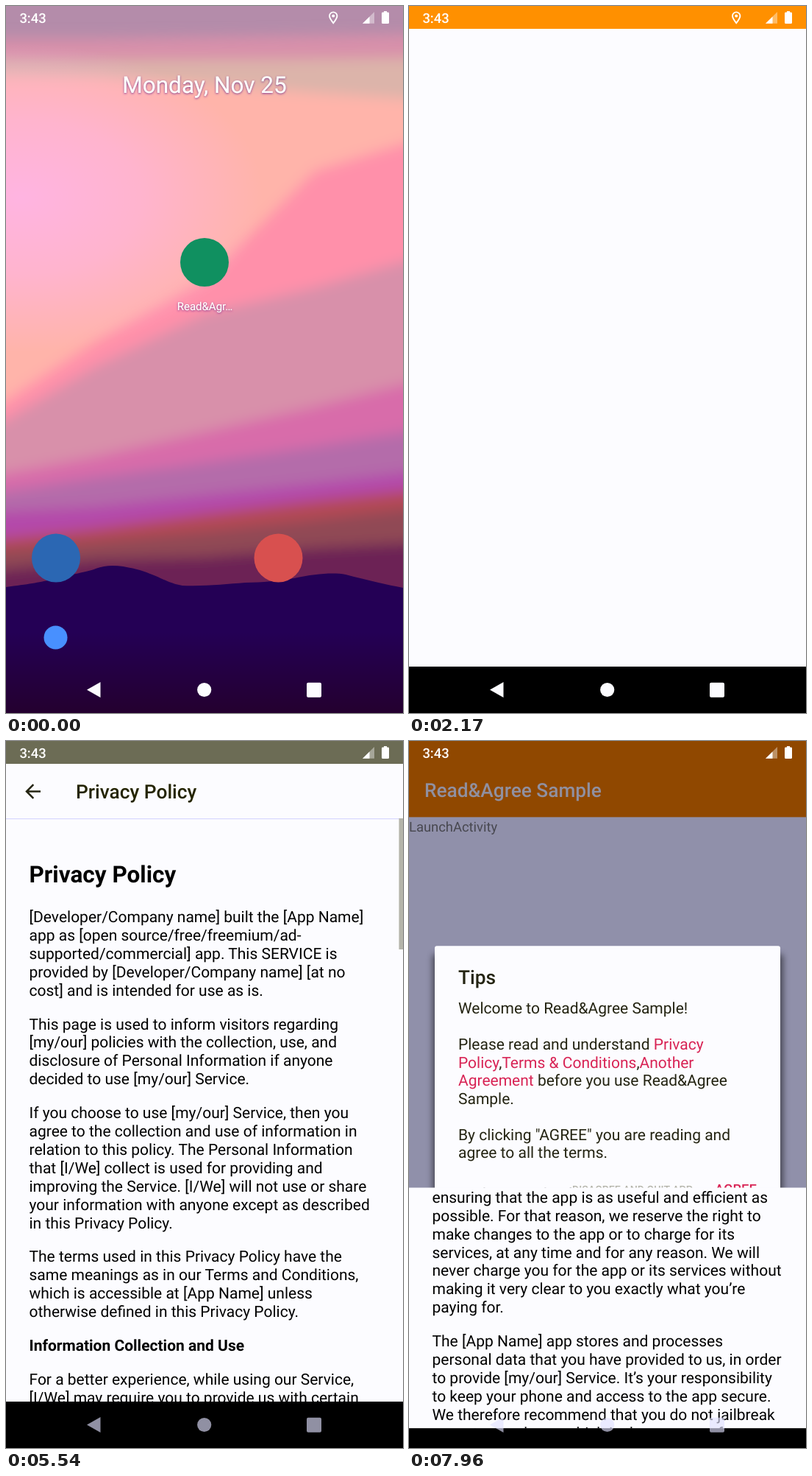
An HTML page that plays this animation: 540x960 px, repeating every 8 s.

```html
<!DOCTYPE html>
<html lang="en">
<head>
<meta charset="utf-8">
<title>Read and agree demo</title>
<style>
html, body { margin: 0; width: 100%; height: 100%; overflow: hidden; background: #000; }
svg { display: block; width: 100%; height: 100%; }
text { font-family: Roboto, "Noto Sans", sans-serif; white-space: pre; text-rendering: geometricPrecision; }
.medium { font-weight: 500; }
.bold { font-weight: 700; }
.title { font-size: 26.25px; font-weight: 500; }
.body { font-size: 21px; }
.link { fill: #d82455; }
</style>
</head>
<body>
<svg viewBox="0 0 540 960" xmlns="http://www.w3.org/2000/svg">
  <defs>
    <filter id="soft" x="-10%" y="-10%" width="120%" height="120%"><feGaussianBlur stdDeviation="9"/></filter>
    <filter id="haze" x="-10%" y="-10%" width="120%" height="120%"><feGaussianBlur stdDeviation="4"/></filter>
    <filter id="glow" x="-20%" y="-40%" width="140%" height="180%">
      <feDropShadow dx="0" dy="1" stdDeviation="1.8" flood-color="#7a2a90" flood-opacity=".95"/>
    </filter>
    <radialGradient id="blush">
      <stop offset="0" stop-color="#ffb4ff" stop-opacity=".65"/>
      <stop offset=".5" stop-color="#ffb4ff" stop-opacity=".42"/>
      <stop offset="1" stop-color="#ffb4ff" stop-opacity="0"/>
    </radialGradient>
    <linearGradient id="dusk" x1="0" y1="0" x2="0" y2="1">
      <stop offset="0" stop-color="#240000" stop-opacity="0"/>
      <stop offset="1" stop-color="#240000" stop-opacity=".45"/>
    </linearGradient>
    <clipPath id="launchClip"><rect id="launchRect"/></clipPath>
    <clipPath id="pageClip"><rect id="pageRect" width="540" height="960"/></clipPath>
    <clipPath id="viewClip"><rect y="105" width="540" height="792"/></clipPath>
  </defs>

  <g id="home">
    <rect width="540" height="960" fill="#b48caa"/>
    <g id="sky" filter="url(#soft)"></g>
    <ellipse cx="20" cy="260" rx="330" ry="210" fill="url(#blush)"/>
    <path d="M0 789 C30 785 45 783 60 779 C90 771 110 769 122 764 C140 757 160 760 182 766 C208 774 221 784 240 787 C270 788 300 785 325 783 C350 783 370 780 392 777 C420 771 445 769 462 772 C485 778 510 784 540 790 V960 H0Z" fill="#240055"/>
    <rect y="850" width="540" height="110" fill="url(#dusk)"/>
    <g fill="#fff" filter="url(#glow)">
      <text x="270" y="118" font-size="31.5" text-anchor="middle">Monday, Nov 25</text>
      <text x="270.5" y="413" font-size="15" text-anchor="middle">Read&amp;Agr…</text>
    </g>
    <circle cx="270" cy="348" r="33" fill="#109060"/>
    <circle cx="68" cy="749.5" r="33" fill="#2b67b3"/>
    <circle cx="370.5" cy="749.5" r="33" fill="#d8504f"/>
    <circle cx="67.5" cy="857.5" r="16" fill="#4890ff"/>
  </g>

  <g id="splash" clip-path="url(#launchClip)">
    <rect width="540" height="960" fill="#fcfcff"/>
    <rect width="540" height="31" fill="#ff9000"/>
    <rect y="897" width="540" height="63"/>
  </g>

  <g id="app">
    <rect id="appBg" width="540" height="980"/>
    <rect id="appBar" width="540" height="105"/>
    <rect y="897" width="540" height="100"/>
    <text id="appTitle" class="title" x="21" y="78">Read&amp;Agree Sample</text>
    <text id="appText" x="0" y="125" font-size="18.4">LaunchActivity</text>
    <g id="dialog">
      <rect x="32" y="291" width="477" height="369" rx="5" opacity=".5" filter="url(#haze)"/>
      <rect x="35" y="280" width="470" height="368" rx="3" fill="#fcfcff"/>
      <g fill="#242412">
        <text class="title" x="67" y="331.3">Tips</text>
        <g id="message" class="body"></g>
      </g>
      <text class="medium" x="222" y="616" font-size="14.2" fill="#b4b4aa">DISAGREE AND QUIT APP</text>
      <text class="medium link" x="416" y="616.3" font-size="18.4">AGREE</text>
    </g>
  </g>

  <g id="page" clip-path="url(#pageClip)"></g>

  <g id="navKeys">
    <path d="M110 928.5 L128.5 918 V939Z"/>
    <circle cx="269.7" cy="928.5" r="9.6"/>
    <rect x="409" y="918.7" width="20" height="20" rx="2"/>
  </g>
  <g fill="#fff">
    <text class="medium" x="18.4" y="23" font-size="18.4">3:43</text>
    <g id="pin">
      <path d="M445.2 23.2 C442 19.2 440 16.6 440 13.6 A5.2 5.2 0 0 1 450.4 13.6 C450.4 16.6 448.4 19.2 445.2 23.2Z" fill="none" stroke="#fff" stroke-width="1.9"/>
      <circle cx="445.2" cy="13.6" r="2"/>
    </g>
    <path d="M485 23.7 L501 8 V23.7Z" opacity=".4"/>
    <path d="M485 23.7 L494.5 14.4 V23.7Z"/>
    <path d="M512.5 8.6 H514 V7 H518 V8.6 H519.5 Q521 8.6 521 10 V22.5 Q521 24 519.5 24 H512.5 Q511 24 511 22.5 V10 Q511 8.6 512.5 8.6Z"/>
  </g>
  <circle id="touch" r="14.5" fill="#e4e4e4" fill-opacity=".45" stroke="#fff" stroke-opacity=".45" stroke-width="1.5"/>
</svg>

<script>
const LOOP = 8000;
const $ = id => document.getElementById(id);
const set = (el, attrs) => { for (const k in attrs) el.setAttribute(k, attrs[k]); };
const clamp = v => Math.min(1, Math.max(0, v));
const span = (t, start, length) => clamp((t - start) / length);
const mix = (a, b, k) => a + (b - a) * k;
const show = (el, on) => { el.style.display = on ? '' : 'none'; };

function add(parent, tag, attrs, text = '') {
  const el = document.createElementNS('http://www.w3.org/2000/svg', tag);
  set(el, attrs);
  el.textContent = text;
  parent.appendChild(el);
  return el;
}

// Sky layers, top to bottom: colour, then the upper edge from left to right.
const layers = [
  ['#d890aa', 44, 44, 42, 40, 38],
  ['#dcb4aa', 72, 74, 73, 72, 70],
  ['#ffb4aa', 94, 96, 106, 118, 128],
  ['#ff90aa', 556, 456, 372, 224, 178],
  ['#d890aa', 580, 490, 418, 382, 338],
  ['#d86caa', 640, 612, 578, 544, 506],
  ['#b46caa', 664, 640, 620, 598, 574],
  ['#b448aa', 688, 680, 664, 648, 630],
  ['#b44855', 726, 710, 690, 672, 656],
  ['#904855', 742, 728, 714, 698, 680],
  ['#6c2455', 768, 752, 748, 736, 728]
];
for (const [fill, ...ys] of layers) {
  const edge = ys.map((y, i) => `${-30 + i * 150} ${y}`).join(' L');
  add($('sky'), 'path', { fill, d: `M${edge} V860 H-30Z` });
}

// Links are wrapped in braces; empty strings leave a blank line.
const message = [
  'Welcome to Read&Agree Sample!', '',
  'Please read and understand {Privacy}',
  '{Policy},{Terms & Conditions},{Another}',
  '{Agreement} before you use Read&Agree',
  'Sample.', '',
  'By clicking "AGREE" you are reading and',
  'agree to all the terms.'
];
message.forEach((line, i) => {
  const row = add($('message'), 'text', { x: 67, y: 372 + i * 24.5 });
  line.split(/[{}]/).forEach((part, j) => add(row, 'tspan', j % 2 ? { class: 'link' } : {}, part));
});

const privacy = [
  '[Developer/Company name] built the [App Name]|app as [open source/free/freemium/ad-|supported/commercial] app. This SERVICE is|provided by [Developer/Company name] [at no|cost] and is intended for use as is.',
  'This page is used to inform visitors regarding|[my/our] policies with the collection, use, and|disclosure of Personal Information if anyone|decided to use [my/our] Service.',
  'If you choose to use [my/our] Service, then you|agree to the collection and use of information in|relation to this policy. The Personal Information|that [I/We] collect is used for providing and|improving the Service. [I/We] will not use or share|your information with anyone except as described|in this Privacy Policy.',
  'The terms used in this Privacy Policy have the|same meanings as in our Terms and Conditions,|which is accessible at [App Name] unless|otherwise defined in this Privacy Policy.',
  '*Information Collection and Use',
  'For a better experience, while using our Service,|[I/We] may require you to provide us with certain'
];
const terms = [
  'By downloading or using the app, these terms will|automatically apply to you – you should make sure|therefore that you read them carefully before using|the app. You’re not allowed to copy or modify the|app, any part of the app, or our trademarks in any|way. You’re not allowed to attempt to extract the|source code of the app, and you also shouldn’t try|to translate the app into other languages or make|derivative versions. The app itself, and all the|trademarks, copyright, database rights, and other|intellectual property rights related to it, still belong|to [Developer/Company name].',
  '[Developer/Company name] is committed to|ensuring that the app is as useful and efficient as|possible. For that reason, we reserve the right to|make changes to the app or to charge for its|services, at any time and for any reason. We will|never charge you for the app or its services without|making it very clear to you exactly what you’re|paying for.',
  'The [App Name] app stores and processes|personal data that you have provided to us, in order|to provide [my/our] Service. It’s your responsibility|to keep your phone and access to the app secure.|We therefore recommend that you do not jailbreak|or root your phone, which is the process of'
];

function buildPage(title, paragraphs) {
  const page = add($('page'), 'g', {});
  add(page, 'rect', { width: 540, height: 960, fill: '#fcfcff' });
  add(page, 'rect', { width: 540, height: 31, fill: '#6c6c55' });
  add(page, 'rect', { y: 105, width: 540, height: 1.2, fill: '#d8d8ff' });
  add(page, 'path', { d: 'M47 68.5 H28 M37.3 59.2 L28 68.5 L37.3 77.8', fill: 'none', stroke: '#242412', 'stroke-width': 2.5 });
  add(page, 'text', { class: 'title', x: 95, y: 78, fill: '#242400' }, title);
  const view = add(page, 'g', { 'clip-path': 'url(#viewClip)' });
  add(view, 'text', { class: 'bold', x: 31.5, y: 191.5, 'font-size': 31.5 }, title);
  let y = 246;
  for (const p of paragraphs) {
    const bold = p[0] === '*';
    for (const line of p.slice(bold ? 1 : 0).split('|')) {
      add(view, 'text', { class: bold ? 'body bold' : 'body', x: 31.5, y }, line);
      y += 24.9;
    }
    y += 21;
  }
  add(view, 'rect', { x: 534.5, y: 105, width: 5.5, height: 178, fill: '#b4b4aa' });
  add(page, 'rect', { y: 897, width: 540, height: 63 });
  return page;
}
const privacyPage = buildPage('Privacy Policy', privacy);
const termsPage = buildPage('Terms & Conditions', terms);

// y at x on a cubic given by four points, found by bisection.
function bezier(x, [x0, y0, x1, y1, x2, y2, x3, y3]) {
  const at = (a, b, c, d, s) => {
    const r = 1 - s;
    return r * r * r * a + 3 * r * r * s * b + 3 * r * s * s * c + s * s * s * d;
  };
  let lo = 0, hi = 1;
  for (let i = 0; i < 24; i++) {
    const mid = (lo + hi) / 2;
    if (at(x0, x1, x2, x3, mid) < x) lo = mid; else hi = mid;
  }
  return at(y0, y1, y2, y3, lo);
}
const standard = x => bezier(x, [0, 0, .4, 0, .2, 1, 1, 1]);
const emphasized = x => x < 1 / 6
  ? bezier(x, [0, 0, .05, 0, .1333, .06, .1667, .4])
  : bezier(x, [.1667, .4, .2083, .82, .25, 1, 1, 1]);

// Colours from undimmed through partly dimmed to fully dimmed.
const shades = {
  appBg: [[252, 252, 255], [144, 144, 170], [108, 108, 85]],
  appBar: [[255, 144, 0], [144, 72, 0], [108, 72, 0]],
  appTitle: [[252, 252, 255], [144, 144, 160], [108, 108, 90]],
  appText: [[112, 112, 112], [72, 72, 80], [40, 40, 92]]
};
function shade(stops, dim) {
  const low = dim < .75;
  const k = low ? dim / .75 : (dim - .75) / .25;
  const [a, b] = low ? stops : stops.slice(1);
  return `rgb(${a.map((v, i) => Math.round(mix(v, b[i], k)))})`;
}

const LAUNCH = 1690, APP = 3210, DIALOG = 3230;
const OPEN = 5090, CLOSE = 6370, REOPEN = 7891, SLIDE = 425;
const touches = [
  [1430, 1570, 283, 366],
  [4850, 4980, 362, 415],
  [5960, 6120, 38, 70],
  [7640, 7770, 226, 440]
];

function draw(t) {
  show($('home'), t < 2170);
  show($('splash'), t >= LAUNCH && t < APP);
  show($('app'), t >= APP);
  show($('pin'), t < 4400);

  const grow = emphasized(span(t, LAUNCH, 450));
  set($('launchRect'), {
    x: mix(237, 0, grow), y: mix(315, 0, grow),
    width: mix(66, 540, grow), height: mix(66, 960, grow), rx: mix(33, 0, grow)
  });
  $('splash').style.opacity = span(t, LAUNCH, 70);

  // The page rises while its visible part unrolls from the bottom edge.
  let slide, reveal, dim;
  if (t < CLOSE) {
    const k = span(t, OPEN, SLIDE);
    slide = standard(k);
    reveal = emphasized(k);
    dim = span(t, DIALOG, 170) * (1 - span(t, OPEN, 280));
  } else if (t < REOPEN) {
    const k = span(t, CLOSE, SLIDE);
    slide = 1 - standard(k);
    reveal = 1 - emphasized(k);
    dim = span(t, CLOSE, 280);
  } else {
    const k = span(t, REOPEN, SLIDE);
    slide = standard(k);
    reveal = emphasized(k);
    dim = 1 - span(t, REOPEN, 280);
  }
  show($('page'), reveal > 0);
  show(privacyPage, t < REOPEN);
  show(termsPage, t >= REOPEN);
  set($('page'), { transform: `translate(0 ${39.4 * (1 - slide)})` });
  const top = 920.6 * (1 - reveal);
  set($('pageRect'), { y: top, height: 960 - top });

  set($('app'), { transform: `translate(0 ${-19.7 * slide})` });
  for (const id in shades) set($(id), { fill: shade(shades[id], dim) });
  const rise = 1 - (1 - span(t, DIALOG, 170)) ** 2;
  const size = mix(.9, 1, rise);
  set($('dialog'), { opacity: rise, transform: `translate(270 464) scale(${size}) translate(-270 -464)` });

  const faded = t >= DIALOG;
  set($('navKeys'), { fill: faded ? '#e1e1ff' : '#fcfcff', opacity: faded ? .64 : 1 });

  const touch = touches.find(([from, to]) => t >= from && t < to);
  show($('touch'), touch);
  if (touch) set($('touch'), { cx: touch[2], cy: touch[3] });
}

const begin = performance.now();
function tick() {
  draw((performance.now() - begin) % LOOP);
  requestAnimationFrame(tick);
}
tick();
</script>
</body>
</html>
```
